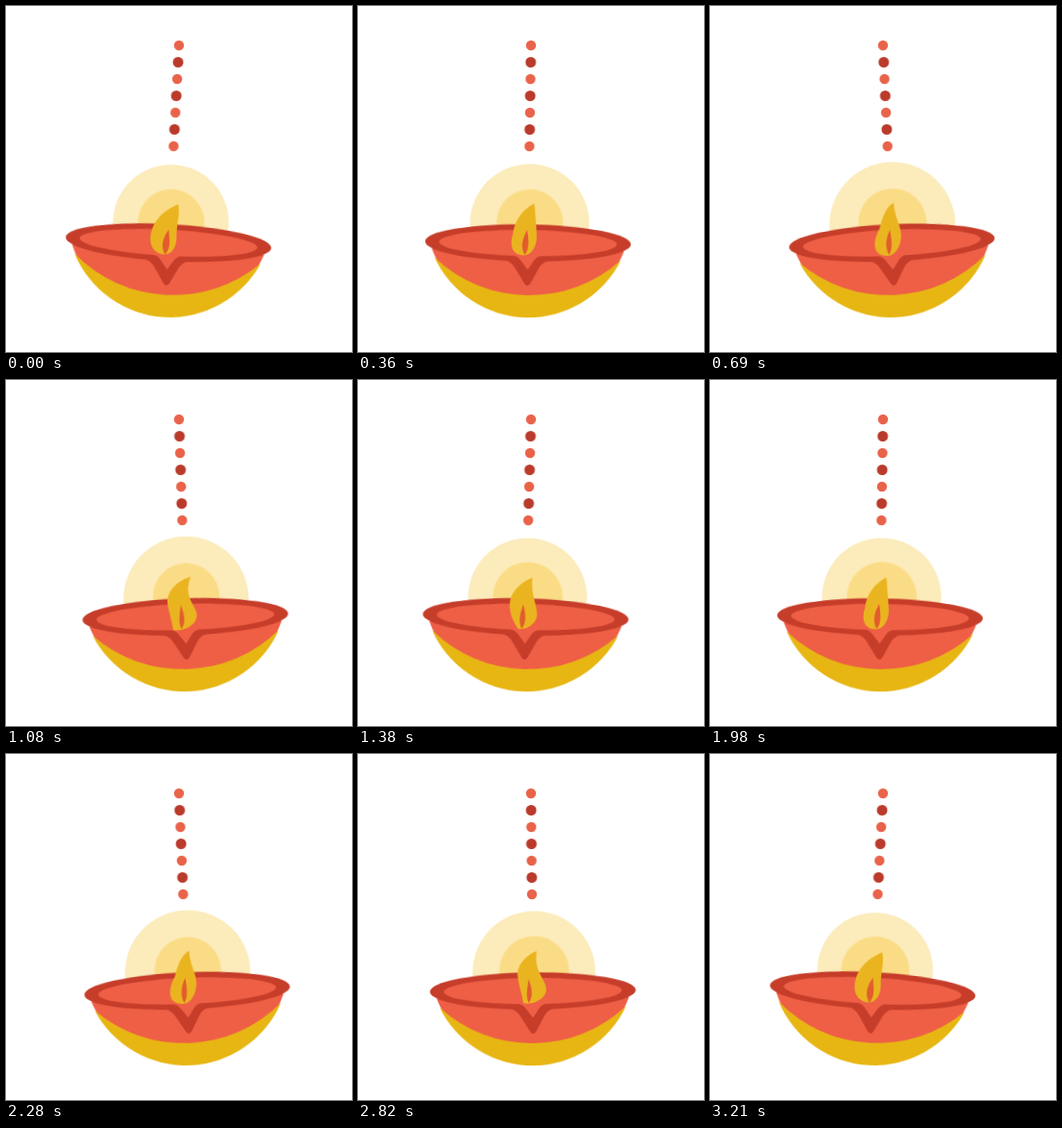
Animation of 360x360 px, one loop 3240 ms. Source, as an HTML page without scripts:

```html
<!DOCTYPE html>
<html lang="en">
<head>
<meta charset="utf-8">
<title>Swinging diya</title>
<style>
  html, body { margin: 0; width: 100%; height: 100%; overflow: hidden; background: #fff; }
  svg { display: block; width: 100vw; height: 100vh; }

  /* half a cosine wave */
  .swing, .halo, .core {
    animation: 810ms cubic-bezier(.364, 0, .636, 1) infinite alternate;
  }
  .swing { transform-origin: 180px 41px; animation-name: swing; animation-delay: -1590ms; }
  .halo { transform-origin: 181.4px 195px; animation-name: halo; animation-delay: -1570ms; }
  .core { transform-origin: 181.6px 215px; animation-name: core; animation-duration: 180ms; animation-delay: -300ms; }
  .flame { animation: flame 1620ms ease-in-out infinite; }
  .wick { animation: wick 1620ms ease-in-out infinite; }

  @keyframes swing { from { transform: rotate(3.07deg); } to { transform: rotate(-3.07deg); } }
  @keyframes halo { from { transform: scale(.95); } to { transform: scale(1.045); } }
  @keyframes core { from { transform: scale(.95); } to { transform: scale(1.05); } }

  @keyframes flame {
    0%, 4%, 100% { d: path("M188 206C178 211 161 222 161 243C161 253 168 259 176 259C184 259 189 250 188 240C187 229 191 217 188 206Z"); }
    41.7% { d: path("M184 205C176 208 171 220 168 231C159 246 160 260 175 260C184 260 190 249 190 238C190 228 183 217 184 205Z"); }
    66.7% { d: path("M187 205C174 208 161 219 162 232C163 242 166 250 167 260C180 262 193 254 192 244C191 234 178 226 187 205Z"); }
    74.1% { d: path("M184.5 205C174 209 163 219 164.5 232C165.5 242 169 250 170 259C180 262 195 254 194 244C193 234 181 226 184.5 205Z"); }
  }
  @keyframes wick {
    0%, 4%, 100% { d: path("M179.5 233C175 240 171 250 177 259C183 253 181 243 179.5 233Z"); }
    41.7% { d: path("M178.5 233C174.5 241 172 251 176.5 259C181 253 180 243 178.5 233Z"); }
    66.7%, 74.1% { d: path("M175.5 234C175 243 172 250 175.5 259C181 253 179 242 175.5 234Z"); }
  }
</style>
</head>
<body>
<svg viewBox="0 0 360 360">
  <g class="swing">
    <g fill="none" stroke-linecap="round">
      <path d="M180 41V147" stroke="#e9634a" stroke-width="10.4" stroke-dasharray="0 35"/>
      <path d="M180 58.5V129" stroke="#ba3b2b" stroke-width="11" stroke-dasharray="0 35"/>
    </g>

    <circle class="halo" cx="181.4" cy="227" r="63.3" fill="#fcebbb"/>
    <circle class="core" cx="181.6" cy="225.5" r="35.5" fill="#fbdc86"/>

    <!-- bowl -->
    <path d="M80 254A107.5 107.5 0 0 0 280 254Z" fill="#ee5f45"/>
    <path d="M83 263A107.5 107.5 0 0 0 277 263A142.8 142.8 0 0 1 83 263Z" fill="#e7b613"/>
    <ellipse cx="180" cy="246.5" rx="107" ry="19.3" fill="#c63d2a"/>
    <path d="M154 264Q163 266 167 273L177 289Q180 293 183 289L191.5 273Q195 266 204 264L200 258H160Z" fill="#c63d2a"/>
    <ellipse cx="180" cy="246.7" rx="92.5" ry="13.6" fill="#ee5f45"/>
    <path d="M162 259Q169 260 172 264L180 274.5L187 264Q190 260 197 259Z" fill="#ee5f45"/>

    <path class="flame" fill="#eab421" d="M188 206C178 211 161 222 161 243C161 253 168 259 176 259C184 259 189 250 188 240C187 229 191 217 188 206Z"/>
    <path class="wick" fill="#e25c2d" d="M179.5 233C175 240 171 250 177 259C183 253 181 243 179.5 233Z"/>
  </g>
</svg>
</body>
</html>
```
